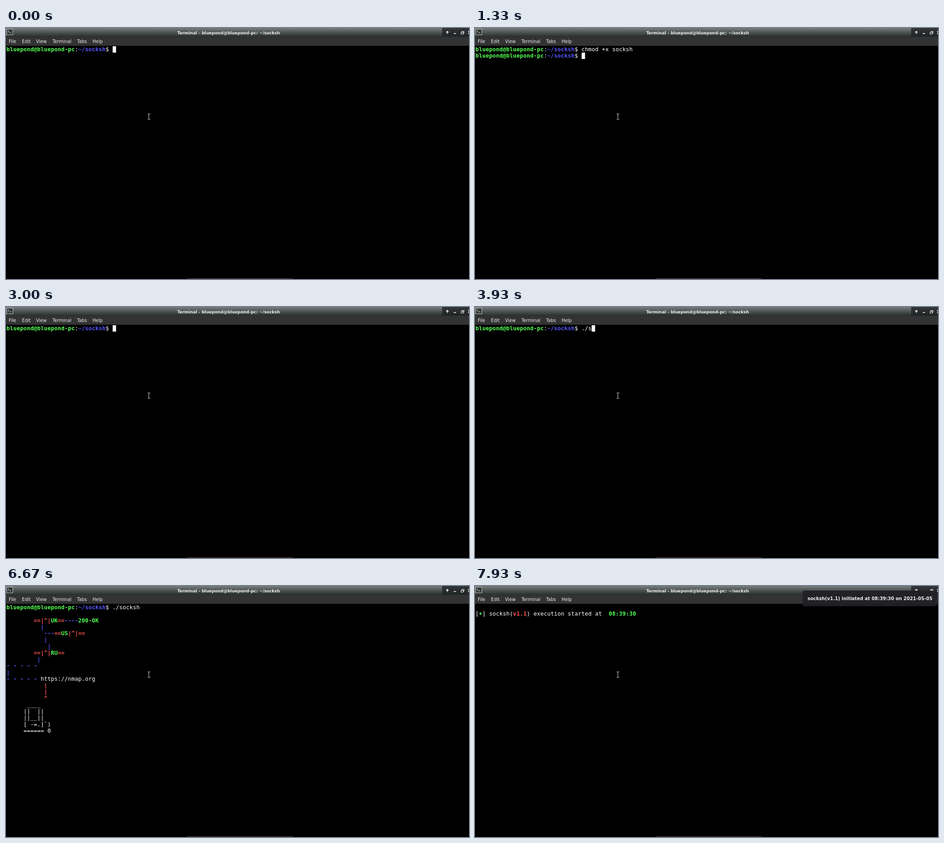
Animation, 1016 px wide and 551 px high, one loop 8 s. Source, as an HTML page with a canvas:

```html
<!DOCTYPE html>
<html lang="en">
<head>
<meta charset="utf-8">
<title>Terminal</title>
<style>
  html, body { margin: 0; width: 100%; height: 100%; overflow: hidden; background: #000; }
  canvas { display: block; }
</style>
</head>
<body>
<canvas id="stage" width="1016" height="551"></canvas>
<script>
const ctx = document.getElementById('stage').getContext('2d');
const LOOP = 8000, CELL = 7.5, ROW = 14.25, LEFT = 1, TOP = 39.75;
const SANS = '"DejaVu Sans", sans-serif';
const MONO = '"DejaVu Sans Mono", monospace';
const USER = 'bluepond@bluepond-pc';
const PROMPT = `#g${USER}#w:#b~/socksh#w$ `;
const PROMPT_COLS = USER.length + 11;
const COLORS = { w: '#fff', g: '#54ff54', b: '#5454ff', r: '#ff5454' };

const CHMOD = 'chmod +x socksh';
const RUN = './socksh ';

// Shell states: start time, prompt row, typed command, cursor visible
const steps = [
  [0, 0, '', 1], [200, 0, '', 0], [400, 0, '', 1],
  [670, 0, CHMOD, 1], [1270, 0, CHMOD, 0],
  [1330, 1, '', 1], [1930, 1, '', 0],
  [2270, 1, 'c', 1], [2530, 1, 'cl', 1], [2670, 1, 'cle', 1],
  [2800, 1, 'clea', 1], [2870, 1, 'clear', 1],
  [3000, 0, '', 1], [3600, 0, '', 0],
  [3730, 0, './', 1], [3930, 0, './s', 1], [4070, 0, './so', 1],
  [4200, 0, './soc', 1], [4270, 0, './sock', 1], [4470, 0, RUN, 1]
];

// "#" plus a letter switches colour; everything but white is bold
const banner = [
  PROMPT + RUN,
  '',
  '        #r==|^|#gUK#r==#b----#g200-OK',
  '          #b|',
  '           #b---#r==#gUS#r|^|==',
  '           #b|',
  '            #b|',
  '        #r==|^|#gRU#r==',
  '         #b|',
  '#b- - - - -',
  '#b|',
  '#b- - - - - #whttps://nmap.org',
  '           #r|',
  '           #r|',
  '           #r^',
  '      ____',
  '     ||  ||',
  '     ||__||',
  '     [ -=.]`)',
  '     ====== 0'
];
const started = '[#g+#w] socksh(#rv1.1#w) execution started at  #g08:39:30';

function rect(x, y, w, h, fill) {
  ctx.fillStyle = fill;
  ctx.fillRect(x, y, w, h);
}

function label(text, x, y, font, align = 'left') {
  ctx.font = `${font} ${SANS}`;
  ctx.textAlign = align;
  ctx.fillStyle = '#eee';
  ctx.fillText(text, x, y);
}

function stroke(path, color = '#fff', width = 1) {
  ctx.strokeStyle = color;
  ctx.lineWidth = width;
  ctx.stroke(new Path2D(path));
}

function print(row, line) {
  let col = 0;
  ctx.textAlign = 'left';
  ('#w' + line).split(/#(.)/).slice(1).forEach((part, i, parts) => {
    if (i % 2 === 0) return;
    const color = parts[i - 1];
    ctx.font = `${color === 'w' ? '' : 'bold '}12.3px ${MONO}`;
    ctx.fillStyle = COLORS[color];
    for (const ch of part) ctx.fillText(ch, LEFT + CELL * col++, TOP + 11.25 + ROW * row);
  });
}

function cursor(row, col) {
  rect(Math.round(LEFT + CELL * col), Math.round(TOP + ROW * row), 7.5, 14, '#fff');
}

function drawWindow() {
  rect(0, 0, 1016, 551, '#000');

  const bar = ctx.createLinearGradient(0, 0, 0, 20);
  bar.addColorStop(0, '#777c7c');
  bar.addColorStop(0.5, '#4c5252');
  bar.addColorStop(1, '#272d2d');
  rect(0, 0, 1016, 20, bar);
  rect(957, 0, 59, 19, 'rgba(30,32,35,.75)');
  label(`Terminal - ${USER}: ~/socksh`, 488.5, 13.5, 'bold 9px', 'center');

  // Window icon and buttons
  rect(1, 2, 14.5, 13.5, '#c4c8c4');
  rect(2, 3, 12.5, 11.5, '#343a38');
  stroke('M4 5.5L6.5 7.5L4 9.5M7.5 10.5H11', '#eee');
  stroke('M968.5 13V7.5M965.8 10L968.5 7.3L971.2 10', '#fff', 1.4);
  stroke('M982.5 12.2H987.5', '#fff', 1.6);
  stroke('M998.5 9.5H1003.5V13.5H998.5ZM1000.5 9V7.5H1005V11.5H1004');
  stroke('M1014 7L1017 10L1014 13', '#fff', 1.3);

  rect(0, 20, 1016, 19, '#333');
  const menu = { File: 6, Edit: 35, View: 66, Terminal: 102, Tabs: 156, Help: 190 };
  for (const name in menu) label(name, menu[name], 33, '9.8px');

  rect(398, 550, 231, 1, '#70585c');
}

function drawShell(t) {
  const [, row, command, on] = steps.findLast(step => step[0] <= t);
  if (row) print(0, PROMPT + CHMOD);
  print(row, PROMPT + command);
  if (on) cursor(row, PROMPT_COLS + command.length);
}

function drawBanner(t) {
  banner.forEach((line, row) => print(row, line));
  if (Math.floor((t - 4870) / 600) % 2 === 0) cursor(20, 0);
}

function drawNotice() {
  print(1, started);
  ctx.fillStyle = 'rgba(32,32,37,.95)';
  ctx.beginPath();
  ctx.roundRect(719, 10, 295, 34.5, 4);
  ctx.fill();
  label('socksh(v1.1) initiated at 08:39:30 on 2021-05-05', 866.8, 31, 'bold 9.94px', 'center');
}

function frame(now) {
  const t = now % LOOP;
  drawWindow();
  if (t < 4930) drawShell(t);
  else if (t < 7930) drawBanner(t);
  else drawNotice();
  // Mouse pointer
  stroke('M311 188.5H313L313.5 189.5L314 188.5H316.5M313.5 189V200M311 200.5H313L313.5 199.5L314 200.5H316.5', '#ddd');
  requestAnimationFrame(frame);
}
requestAnimationFrame(frame);
</script>
</body>
</html>
```
